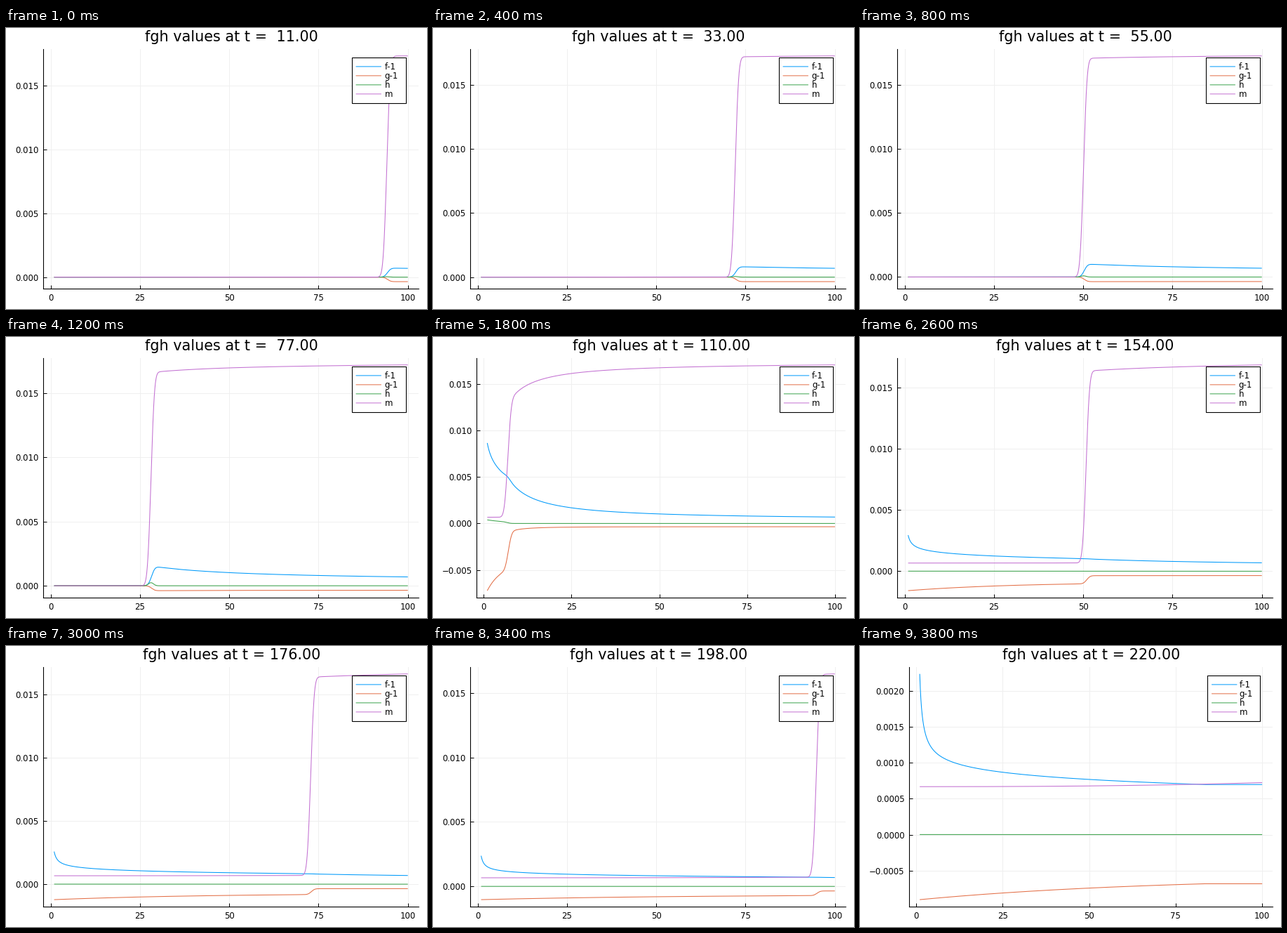
These frames come from a looping animation (600 px wide and 400 px high, 4000 ms). A matplotlib script:

```python
import math

import matplotlib.pyplot as plt
import numpy as np
from matplotlib.animation import FuncAnimation
from matplotlib.patches import Rectangle

FRAMES, INTERVAL = 20, 200
W, H, DPI = 600, 400, 100
TOP, BOTTOM, RIGHT = 30.1, 370.7, 587.8
PX = 72 / DPI
NAMES = ["f-1", "g-1", "h", "m"]
COLORS = ["#009afa", "#e36f47", "#3ea44e", "#c371d2"]

plt.rcParams["font.family"] = "DejaVu Sans"
plt.rcParams["text.kerning_factor"] = 6
x = np.linspace(1, 100, 2400)
erf = np.vectorize(math.erf)


def step(c):
    return (1 + erf((x - c) / 1.08)) / 2


def blend(a, b, s):
    return a * (1 - s) + b * s


def mass_outside(t):
    """Mass beyond the pulse, approaching its edge value like 1/x."""
    times = [11, 55, 77, 110, 154, 198]
    edge = np.interp(t, times, [.01731, .01724, .01718, .01705, .01682, .01649])
    slope = np.interp(t, times, [.018, .019, .0231, .0306, .052, .085])
    return edge - slope * (1 / x - 0.01)


def fields(t):
    """Pulse runs inwards, passes the centre, then runs outwards."""
    inward = t < 104
    c = 105.1 - t if inward else t - 103.2
    s, late = step(c), step(c + 0.2)
    f_out = 0.00035 + 0.0339 / (x + 0.5)
    g_out = -0.00035 - 0.0289 / x**2
    if inward:
        f_in = g_in = m_in = 0
        h = 0.00024 * (28 / c) ** 1.6 * np.exp(-(x - c) ** 2)
    else:
        r = np.minimum(x, 200 - c)  # wave coming back from the outer edge
        f_in = (0.00036 + 0.0339 / (c + 0.5) + 0.016 / (c + 2) * np.log(c / r)
                + 0.00099 * (1 - math.exp(-c / 38)) * r**-1.4)
        g_in = -(0.00035 + 0.0274 / (c + 0.2)
                 + 0.039 / (c + 3.5) * np.exp(-r / (0.6 * c)))
        m_in = 0.000667 + 0.000056 * (x / 100) ** 2.5
        h = 0.00038 * (6.8 / c) ** 2 * np.exp(-(x - 1) / c) * (1 - s)
    return [blend(f_in, f_out, late), blend(g_in, g_out, late), h,
            blend(m_in, mass_outside(t), s)]


def y_ticks(lo, hi):
    if hi - lo > 0.01:
        gap, digits = 0.005, 3
    elif lo <= -0.001:
        gap, digits = 0.001, 3
    else:
        gap, digits = 0.0005, 4
    n = np.arange(math.ceil(lo / gap), math.floor(hi / gap) + 1)
    labels = [f"{k * gap:.{digits}f}".replace("-", "\u2212") for k in n]
    indent = 17 if digits == 4 else 9 if n[0] < 0 else 0
    return n * gap, labels, indent


fig = plt.figure(figsize=(W / DPI, H / DPI), dpi=DPI, facecolor="white")
ax = fig.add_axes([0, 0, 1, 1])
top = fig.add_axes([0, 0, 1, 1], zorder=5)


def draw_legend(indent):
    x0, x1 = 492.9 + 0.147 * indent, 569.9 + 0.035 * indent
    top.add_patch(Rectangle((x0, 42), x1 - x0, 65, fc="white", ec="black",
                            lw=PX * 1.1))
    for i, (name, color) in enumerate(zip(NAMES, COLORS)):
        y = 54.9 + 13 * i
        top.plot([x0 + 5.7, x0 + 42], [y, y], color=color, lw=PX,
                 solid_capstyle="butt", snap=False)
        top.text(539.6 + 0.06 * indent, y + 4.2, name, fontsize=8.5,
                 va="baseline")


def draw(i):
    t = 11 * (i + 1)
    data = fields(t)
    lo, hi = min(map(np.min, data)), max(map(np.max, data))
    pad = 0.03 * (hi - lo)
    lo, hi = lo - pad, hi + pad
    ticks, labels, indent = y_ticks(lo, hi)
    left = 53.49 + indent

    ax.clear()
    ax.set_position([left / W, 1 - BOTTOM / H, (RIGHT - left) / W,
                     (BOTTOM - TOP) / H])
    ax.set_axisbelow(True)
    ax.grid(color="#efefef", lw=PX)
    ax.spines[["top", "right"]].set_visible(False)
    ax.spines[["left", "bottom"]].set_linewidth(PX * 1.1)
    ax.tick_params(direction="in", length=5 * PX, width=PX, pad=5.1,
                   labelsize=8.5)
    for y, color in zip(data, COLORS):
        ax.plot(x, y, color=color, lw=PX * 1.05, snap=False,
                solid_capstyle="butt")
    ax.set_xticks(range(0, 101, 25))
    ax.set_yticks(ticks, labels)
    ax.set_xlim(1 - 2.97, 100 + 2.97)
    ax.set_ylim(lo, hi)

    top.clear()
    top.set_axis_off()
    top.set_xlim(0, W)
    top.set_ylim(H, 0)
    top.text((left + RIGHT) / 2 + 0.5, 18.9, f"fgh values at t = {t:6.2f}",
             fontsize=14.95, ha="center", va="baseline")
    draw_legend(indent)
    return []


anim = FuncAnimation(fig, draw, frames=FRAMES, interval=INTERVAL,
                     repeat=True, repeat_delay=0, blit=False)
plt.show()
```
